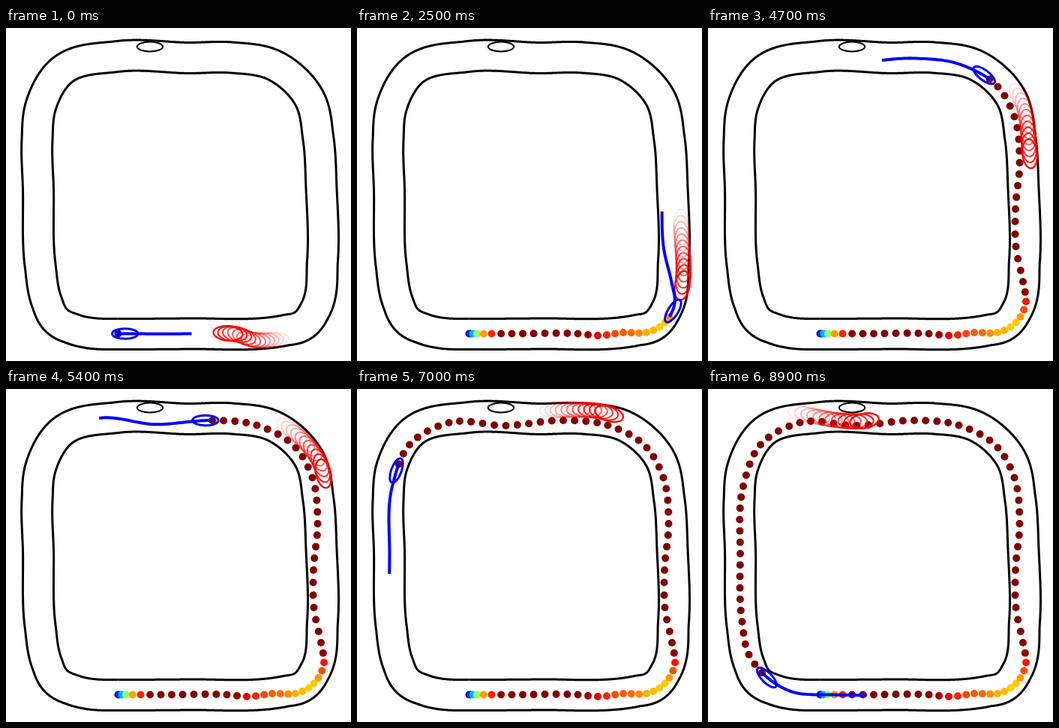
Recreate the animation shown at these times as an HTML page with a canvas. Size 460x445 px, loop 9000 ms.

```html
<!DOCTYPE html>
<html lang="en">
<head>
<meta charset="utf-8">
<title>Track lap with overtaking</title>
<style>
html, body { margin: 0; width: 100%; height: 100%; overflow: hidden; background: #fff; }
canvas { display: block; }
</style>
</head>
<body>
<canvas id="stage" width="460" height="445"></canvas>
<script>
const ctx = document.getElementById('stage').getContext('2d');
const STEPS = 90, STEP_MS = 100, ROAD = 41, FULL_SPEED = 13.8;

// Smooth curve through keys [t, x, y]; returns t => [x, y]
function curve(keys) {
  const last = keys.length - 1;
  const rate = (i, d) => (keys[i + 1][d] - keys[i][d]) / (keys[i + 1][0] - keys[i][0]);
  function slope(i, d) {
    if (i === 0) return 1.5 * rate(0, d) - 0.5 * slope(1, d);
    if (i === last) return rate(i - 1, d);
    const before = keys[i][0] - keys[i - 1][0], after = keys[i + 1][0] - keys[i][0];
    return (before * rate(i, d) + after * rate(i - 1, d)) / (before + after);
  }
  return t => {
    let i = 0;
    while (i < last - 1 && keys[i + 1][0] <= t) i++;
    const p = keys[i], q = keys[i + 1], h = q[0] - p[0];
    const u = Math.min(1, Math.max(0, (t - p[0]) / h)), v = 1 - u;
    return [1, 2].map(d => p[d] * v * v * (1 + 2 * u) + q[d] * u * u * (3 - 2 * u)
      + h * u * v * (v * slope(i, d) - u * slope(i + 1, d)));
  };
}

function velocity(path, t) {
  const a = path(Math.max(t - 0.5, 0)), b = path(t + 0.5);
  return [b[0] - a[0], b[1] - a[1]];
}

function heading(path, t) {
  const [dx, dy] = velocity(path, t);
  return Math.atan2(dy, dx);
}

const speed = t => Math.hypot(...velocity(car, t));

// Inner wall; the outer one runs parallel to it
const corners = [
  [149, 388.5], [95, 382.5], [82, 376.5], [74, 360], [66, 315], [63.5, 215],
  [62, 150], [66, 110], [86, 74], [150, 58.5], [245, 60.5], [300, 60], [350, 69],
  [386, 103], [396, 150], [400, 215], [401.5, 310], [394, 367], [385, 380],
  [370, 383.5], [240, 388], [149, 388.5]];
const inner = new Path2D(), outer = new Path2D();
{
  let s = 0;
  const wall = curve(corners.map((p, i) => {
    if (i) s += Math.hypot(p[0] - corners[i - 1][0], p[1] - corners[i - 1][1]);
    return [s, ...p];
  }));
  for (let d = 0; d <= s; d++) {
    const [x, y] = wall(d), a = heading(wall, d);
    inner.lineTo(x, y);
    outer.lineTo(x + ROAD * Math.sin(a), y - ROAD * Math.cos(a));
  }
}

// Cars as [step, x, y]
const car = curve([
  [0, 149.5, 408.5], [3, 160, 408.5], [5, 179.5, 408.5], [8, 221, 408.5],
  [13, 294.5, 408.5], [15, 321, 411], [18, 355, 407], [21, 386, 407],
  [23, 403.5, 399.5], [25, 416.5, 386], [27, 424, 365.5], [29, 420, 339],
  [32, 410.5, 292], [35, 410, 242], [39, 415.5, 180], [43, 408.5, 118.5],
  [46, 386.5, 78.5], [50, 334.5, 48.5], [54, 275, 42], [59, 198.5, 49],
  [64, 122.5, 45], [68, 70, 74.5], [72, 47, 130], [78, 43, 220],
  [84, 45.5, 311], [87, 54.5, 355], [89, 72, 379], [92, 109, 403.5],
  [96, 169.5, 408.3], [100, 230, 408.5]]);
const rival = curve([
  [0, 296, 408], [2, 308, 409.5], [5, 327, 416], [10, 357, 416.5], [14, 387, 411.5],
  [17, 408, 401], [20, 421, 383], [24, 432, 352], [35, 432, 262], [47, 429, 168],
  [57, 415, 92], [61, 395.5, 68], [71, 329, 31], [78, 277, 28], [85, 231, 33],
  [89, 208.5, 42.5], [93, 176, 42], [100, 118, 31]]);

function jet(v) {
  const c = m => Math.round(255 * Math.min(1, Math.max(0, 1.5 - Math.abs(4 * v - m))));
  return `rgb(${c(3)},${c(2)},${c(1)})`;
}

function oval(x, y, rx, ry, angle, color, width) {
  ctx.beginPath();
  ctx.ellipse(x, y, rx, ry, angle, 0, 2 * Math.PI);
  ctx.strokeStyle = color;
  ctx.lineWidth = width;
  ctx.stroke();
}

function drawTrack() {
  ctx.strokeStyle = '#000';
  ctx.lineWidth = 3;
  ctx.stroke(outer);
  ctx.stroke(inner);
  oval(192, 25, 17.2, 6.4, 0, '#000', 2);
}

// Trail dots coloured by speed
function drawTrail(k) {
  for (let i = 0; i <= k; i++) {
    ctx.fillStyle = jet(Math.min(1, speed(i) / FULL_SPEED));
    ctx.beginPath();
    ctx.arc(...car(i), 5, 0, 2 * Math.PI);
    ctx.fill();
  }
}

function drawRival(k) {
  for (let j = 10; j >= 0; j--) {
    ctx.globalAlpha = 1 - 0.09 * j;
    oval(...rival(k + j), 19.5, 9.8, heading(rival, k + j), '#f00', j ? 2 : 2.3);
  }
  ctx.globalAlpha = 1;
}

// The plan drifts outwards where it ends in a fast bend
function drawCar(k) {
  const len = 9.8, end = k + len;
  const turn = heading(car, end - 3) - heading(car, end);
  const drift = 0.075 * speed(end) ** 2 * Math.atan2(Math.sin(turn), Math.cos(turn));
  ctx.beginPath();
  for (let i = 0; i <= 40; i++) {
    const u = i / 40, t = k + u * len;
    const [x, y] = car(t), a = heading(car, t), o = drift * u ** 1.7;
    ctx.lineTo(x - o * Math.sin(a), y + o * Math.cos(a));
  }
  ctx.strokeStyle = '#00f';
  ctx.lineWidth = 4;
  ctx.lineJoin = 'round';
  ctx.stroke();
  const [x, y] = car(k), a = heading(car, k);
  oval(x + 9.2 * Math.cos(a), y + 9.2 * Math.sin(a), 17.2, 6.8, a, '#00f', 3);
}

let start = null;
function tick(now) {
  if (start === null) start = now;
  const k = Math.floor((now - start) / STEP_MS) % STEPS;
  ctx.fillStyle = '#fff';
  ctx.fillRect(0, 0, 460, 445);
  drawTrack();
  drawTrail(k);
  drawRival(k);
  drawCar(k);
  requestAnimationFrame(tick);
}
requestAnimationFrame(tick);
</script>
</body>
</html>
```
